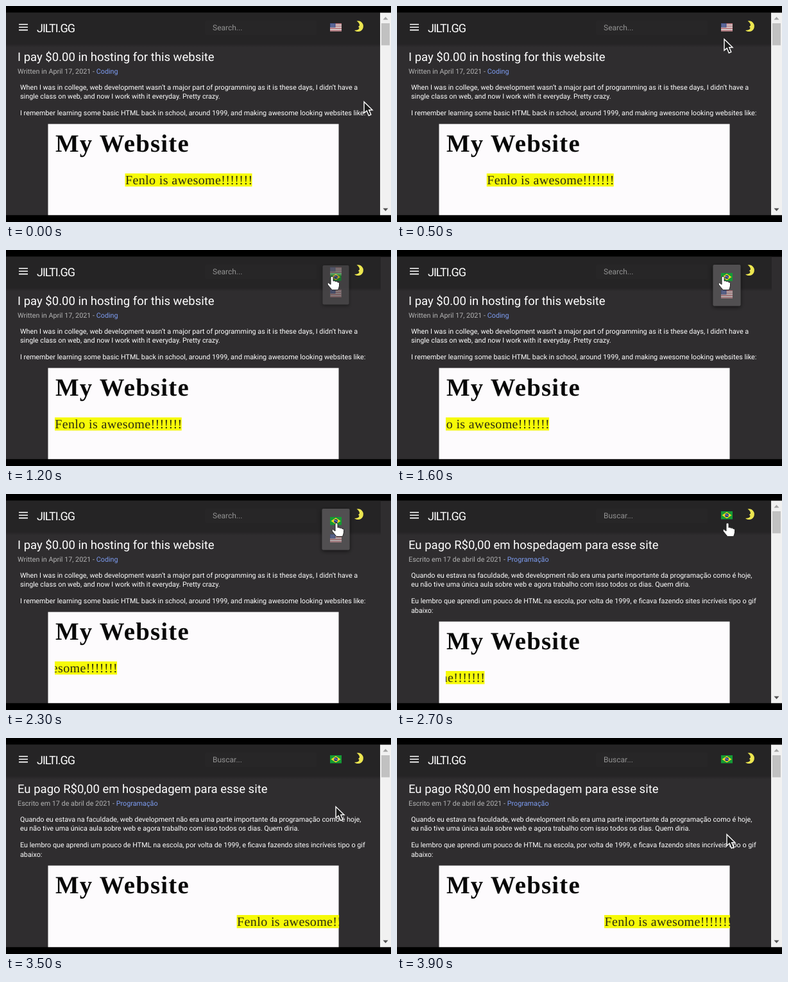
These frames come from a looping animation (600 by 338 pixels, 4000 ms). An HTML page:

```html
<!DOCTYPE html>
<html lang="en">
<head>
<meta charset="utf-8">
<style>
html, body { margin: 0; height: 100%; overflow: hidden; background: #000; }
svg { display: block; }
text { font: 10.81px Roboto, sans-serif; fill: #fff; text-rendering: geometricPrecision; white-space: pre; }
.title { font-size: 18.52px; }
.meta { fill: #b4b4b4; }
.link { fill: #7d9df2; }
.search { font-size: 12px; fill: #929292; }
.logo { font-size: 18px; letter-spacing: -1px; }
.heading { font: bold 38.8px "Liberation Serif", serif; letter-spacing: 1.25px; fill: #080808; }
.marquee { font: 20px "Liberation Serif", serif; letter-spacing: .37px; fill: #2c2c10; }
</style>
</head>
<body>
<svg width="600" height="338" viewBox="0 0 600 338">
  <defs>
    <linearGradient id="shade" x2="0" y2="1">
      <stop stop-color="#000" stop-opacity=".22"/><stop offset="1" stop-color="#000" stop-opacity="0"/>
    </linearGradient>
    <filter id="shadow" x="-30%" y="-30%" width="160%" height="160%">
      <feDropShadow dx="0" dy="2" stdDeviation="3" flood-opacity=".6"/>
    </filter>
    <clipPath id="page"><rect y="10.5" width="600" height="316.8"/></clipPath>
    <clipPath id="lane"><rect x="76" y="255" width="443" height="40"/></clipPath>
    <g id="us">
      <rect width="18" height="12.5" fill="#d6cccc"/>
      <path d="M0 .9h18M0 4.5h18M0 8.1h18M0 11.7h18" stroke="#b5737a" stroke-width="1.7"/>
      <rect width="8.5" height="6.5" fill="#46548a"/>
      <path d="M1.5 2h6M1.5 4.3h6" stroke="#b4bcd4" stroke-width=".8" stroke-dasharray="1 1"/>
    </g>
    <g id="br">
      <rect width="18" height="12.5" fill="#159a35"/>
      <path d="M9 1.2L16.5 6.25 9 11.3 1.5 6.25z" fill="#f5dc1e"/>
      <circle cx="9" cy="6.25" r="3" fill="#22357e"/>
      <path d="M6.3 5.6q3-.5 5.3 1.6" fill="none" stroke="#dfe6f0" stroke-width=".7"/>
    </g>
  </defs>
  <rect width="600" height="338"/>
  <g clip-path="url(#page)">
    <rect y="10" width="600" height="318" fill="#2f2d2f"/>
    <rect y="59" width="584" height="6" fill="url(#shade)"/>
    <rect y="10" width="584" height="49" fill="#252425"/>
    <rect x="310" y="23" width="174" height="22" rx="2" fill="#272627"/>
    <path d="M20 28.8h14M20 33.2h14M20 37.6h14" stroke="#fff" stroke-width="1.6"/>
    <text class="logo" x="48" y="40.5">JILTI.GG</text>
    <path d="M546.5 23.5A8.4 8.4 0 1 1 543 38Q550.5 38 550.5 34L549 32.5 551 30.5Q551 26.5 546.5 23.5z" fill="#ece650"/>
    <g id="en"></g>
    <g id="pt"></g>
    <g id="picture">
      <rect x="65.5" y="184.6" width="453" height="150" fill="#fdfbfd"/>
      <text class="heading" x="77" y="228.3">My Website</text>
      <g clip-path="url(#lane)"><g id="marquee">
        <rect y="262" width="198" height="20.5" fill="#f6fa08"/>
        <text class="marquee" x=".5" y="278.6">Fenlo is awesome!!!!!!!</text>
      </g></g>
    </g>
    <g id="scrollbar">
      <rect x="583" y="10" width="17" height="318" fill="#f1f1f1"/>
      <rect x="585" y="27" width="13" height="34.5" fill="#c1c1c1"/>
      <path d="M587.5 21.5l4-4.5 4 4.5z" fill="#a3a3a3"/>
      <path d="M587.5 316.5l4 4.5 4-4.5z" fill="#505050"/>
    </g>
    <g id="menu">
      <rect x="492.5" y="23" width="43" height="64.5" rx="2" fill="#515051" filter="url(#shadow)"/>
      <use href="#br" x="505" y="36"/>
      <use href="#us" x="505" y="63" opacity=".75"/>
    </g>
    <path id="arrow" d="M0 0V17.5L4.2 14 7.3 21.5 10.8 20 7.7 12.7H13z" fill="#1c1c1c" stroke="#fff" stroke-width="1.4"/>
    <path id="hand" d="M-2 1.5Q0-1.5 2 1.5V7.5Q4 6 5.3 8.3 7.5 7 8.6 9.3 11.5 8.5 11.5 11.5V15Q11 18 9.5 21.5H0L-6.5 13.5Q-8 10.5-5.5 10.3L-2 13z" fill="#fff" stroke="#222" stroke-width="1"/>
  </g>
</svg>
<script>
const $ = id => document.getElementById(id);
const show = (id, on) => $(id).style.display = on ? '' : 'none';
const move = (id, x, y) => $(id).setAttribute('transform', `translate(${x} ${y})`);

function fillPage(id, flag, search, title, meta, link, lines) {
  $(id).innerHTML = `<use href="#${flag}" x="505" y="27"/>
    <text class="search" x="322" y="38">${search}</text>
    <text class="title" x="18" y="86">${title}</text>
    <text class="meta" x="18" y="105.5">${meta} - <tspan class="link">${link}</tspan></text>` +
    lines.map(([y, line]) => `<text x="22" y="${y}">${line}</text>`).join('');
}
fillPage('en', 'us', 'Search...', 'I pay $0.00 in hosting for this website',
  'Written in April 17, 2021', 'Coding', [
    [130.5, 'When I was in college, web development wasn’t a major part of programming as it is these days, I didn’t have a'],
    [145, 'single class on web, and now I work with it everyday. Pretty crazy.'],
    [171, 'I remember learning some basic HTML back in school, around 1999, and making awesome looking websites like:']]);
fillPage('pt', 'br', 'Buscar...', 'Eu pago R$0,00 em hospedagem para esse site',
  'Escrito em 17 de abril de 2021', 'Programação', [
    [130.5, 'Quando eu estava na faculdade, web development não era uma parte importante da programação como é hoje,'],
    [145, 'eu não tive uma única aula sobre web e agora trabalho com isso todos os dias. Quem diria.'],
    [171, 'Eu lembro que aprendi um pouco de HTML na escola, por volta de 1999, e ficava fazendo sites incríveis tipo o gif'],
    [185.5, 'abaixo:']]);

// Pointer path: time, x, y
const path = [[0, 558, 150], [500, 510, 52], [700, 509, 34], [1000, 508, 34], [1200, 508, 41],
  [1700, 508, 41], [2200, 515, 45], [2700, 515, 45], [3100, 514, 83], [3300, 514, 84], [3800, 514, 151], [4000, 514, 151]];

function pointer(t) {
  const i = path.findIndex(p => p[0] > t);
  const [t0, x0, y0] = path[i - 1], [t1, x1, y1] = path[i];
  const k = (t - t0) / (t1 - t0), e = k * k * (3 - 2 * k);
  return [x0 + (x1 - x0) * e, y0 + (y1 - y0) * e];
}

const LOOP = 4000, STEP = 100, OPEN = 1000, CLOSE = 2600, WRAP = 3360, SPEED = 0.0915;

function draw(now) {
  const t = Math.floor(now % LOOP / STEP) * STEP;
  const open = t > OPEN && t < CLOSE, translated = t >= CLOSE;
  show('en', !translated);
  show('pt', translated);
  show('scrollbar', !open);
  move('picture', 0, translated ? 15 : 0);
  move('marquee', t < WRAP ? 185.5 - t * SPEED : 323 + (3900 - t) * SPEED, 0);

  show('menu', open);
  const grow = Math.min(1, (t - OPEN) / 300), s = 0.85 + 0.15 * grow;
  $('menu').setAttribute('opacity', grow);
  $('menu').setAttribute('transform', `translate(514 42) scale(${s}) translate(-514 -42)`);

  const onFlag = t >= 600 && t < 2800;
  show('hand', onFlag);
  show('arrow', !onFlag);
  move(onFlag ? 'hand' : 'arrow', ...pointer(t));
  requestAnimationFrame(() => draw(performance.now()));
}
draw(0);
</script>
</body>
</html>
```
